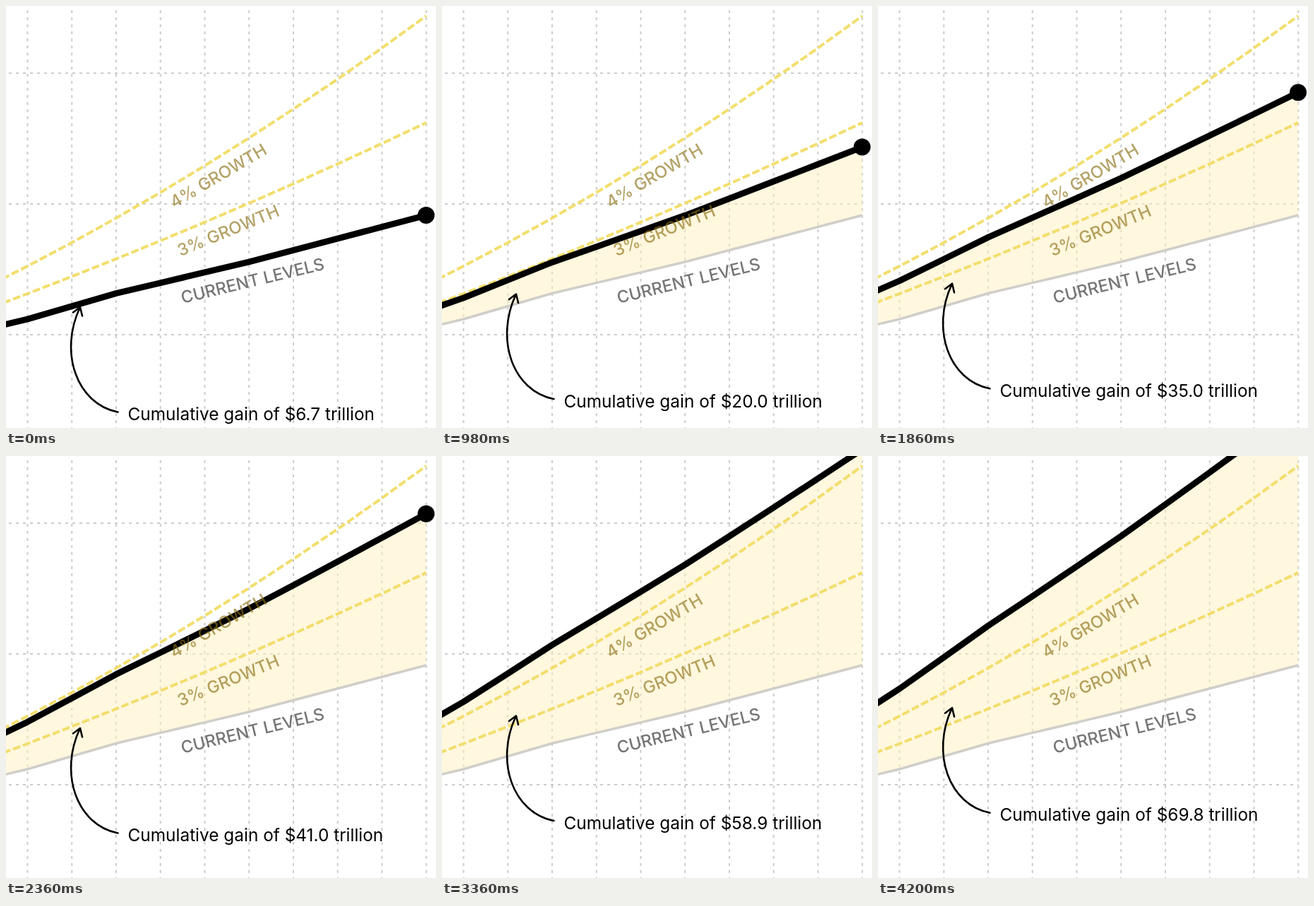
Animation of 609 by 597 pixels, one loop 4.22 s. Source, as an HTML page:

```html
<!DOCTYPE html>
<html lang="en">
<head>
<meta charset="utf-8">
<title>Growth chart</title>
<style>
html, body { margin: 0; width: 100%; height: 100%; overflow: hidden; background: #fff; }
svg { display: block; width: 609px; height: 597px; font: 24.4px Inter, "Open Sans", sans-serif; }
path, polyline { fill: none; }
#grid { stroke: #ccc; stroke-width: 2; stroke-dasharray: 4 6; }
#area { fill: rgba(255, 239, 190, .5); }
#base { stroke: #d0cec9; stroke-width: 3.5; }
.goal { stroke: #f2de6c; stroke-width: 4; stroke-dasharray: 11 4; }
#line { stroke: #000; stroke-width: 8.8; stroke-linejoin: round; }
#arrow { stroke: #000; stroke-width: 2.6; stroke-linecap: round; stroke-linejoin: round; }
.label { font-size: 23.8px; font-weight: 500; }
.gold { fill: rgba(140, 112, 20, .65); }
.gray { fill: rgba(0, 0, 0, .54); }
</style>
</head>
<body>
<svg viewBox="0 0 609 597">
  <path id="grid"/>
  <polygon id="area"/>
  <polyline id="base"/>
  <polyline class="goal" id="four"/>
  <polyline class="goal" id="three"/>
  <polyline id="line"/>
  <circle id="dot" cx="595" r="12"/>
  <text class="label gold" transform="translate(238.5 286.5) rotate(-30.5)">4% GROWTH</text>
  <text class="label gold" transform="translate(247 354.5) rotate(-22.3)">3% GROWTH</text>
  <text class="label gray" transform="translate(250 421) rotate(-13.5)">CURRENT LEVELS</text>
  <g id="note">
    <path id="arrow" d="M158.500 574.500C100 563 75 490 104.500 427M95 433.500L105 426L108 438.500"/>
    <text id="gain" x="172.500" y="586"></text>
  </g>
</svg>
<script>
const LOOP = 4220, TICK = 20;
const $ = id => document.getElementById(id);
const xAt = k => 30.5 + 62.75 * k;

// Columns run from one left of the stage to the right edge.
const columns = Array.from({ length: 11 }, (_, i) => i - 1);

// Current levels bend at these [column, y] points.
const bends = [[-1, 458], [0, 443], [2, 406.5], [5, 362], [9, 296]];
const three = k => 407 - 24 * k - 0.32 * k * k;
const four = k => 368 - 32.45 * k - 0.765 * k * k;
const lift = k => 1.63 + 0.37 * k + 0.0033 * k * k;

// The figure jumps to each gain; the line glides there during the step.
const gains = [6.7, 13.4, 17, 20, 24.3, 30.5, 35, 41, 41, 46, 50.9, 58.9, 65.4, 69.6, 69.8];
const STEP = LOOP / gains.length;

const mix = (a, b, p) => a + (b - a) * p;

function base(k) {
  const i = Math.max(1, bends.findIndex(b => b[0] >= k));
  const [k0, y0] = bends[i - 1], [k1, y1] = bends[i];
  return mix(y0, y1, (k - k0) / (k1 - k0));
}

const curve = f => columns.map(k => [xAt(k), f(k)]);
const plot = (id, pts) => $(id).setAttribute("points", pts.join(" "));

function drawGrid() {
  let d = "";
  for (let k = 0; k < 10; k++) d += `M${xAt(k)} 6V597`;
  for (const y of [95, 280, 465]) d += `M4 ${y}H595`;
  $("grid").setAttribute("d", d);
}

function render(t) {
  const n = Math.floor(t / STEP);
  const v = mix(gains[n - 1] || 0, gains[n], t / STEP - n);
  const top = curve(k => base(k) - v * lift(k));
  const endY = top[top.length - 1][1];
  plot("line", top);
  plot("area", top.concat(curve(base).reverse()));
  $("dot").setAttribute("cy", endY);
  $("dot").style.visibility = endY < -4 ? "hidden" : "visible";
  $("note").setAttribute("transform", `translate(0 ${-v})`);
  $("gain").textContent = `Cumulative gain of $${gains[n].toFixed(1)} trillion`;
}

drawGrid();
plot("base", curve(base));
plot("three", curve(three));
plot("four", curve(four));

const start = performance.now();
function tick(now) {
  const t = Math.max(0, now - start) % LOOP;
  render(Math.floor(t / TICK) * TICK);
  requestAnimationFrame(tick);
}
render(0);
requestAnimationFrame(tick);
</script>
</body>
</html>
```
